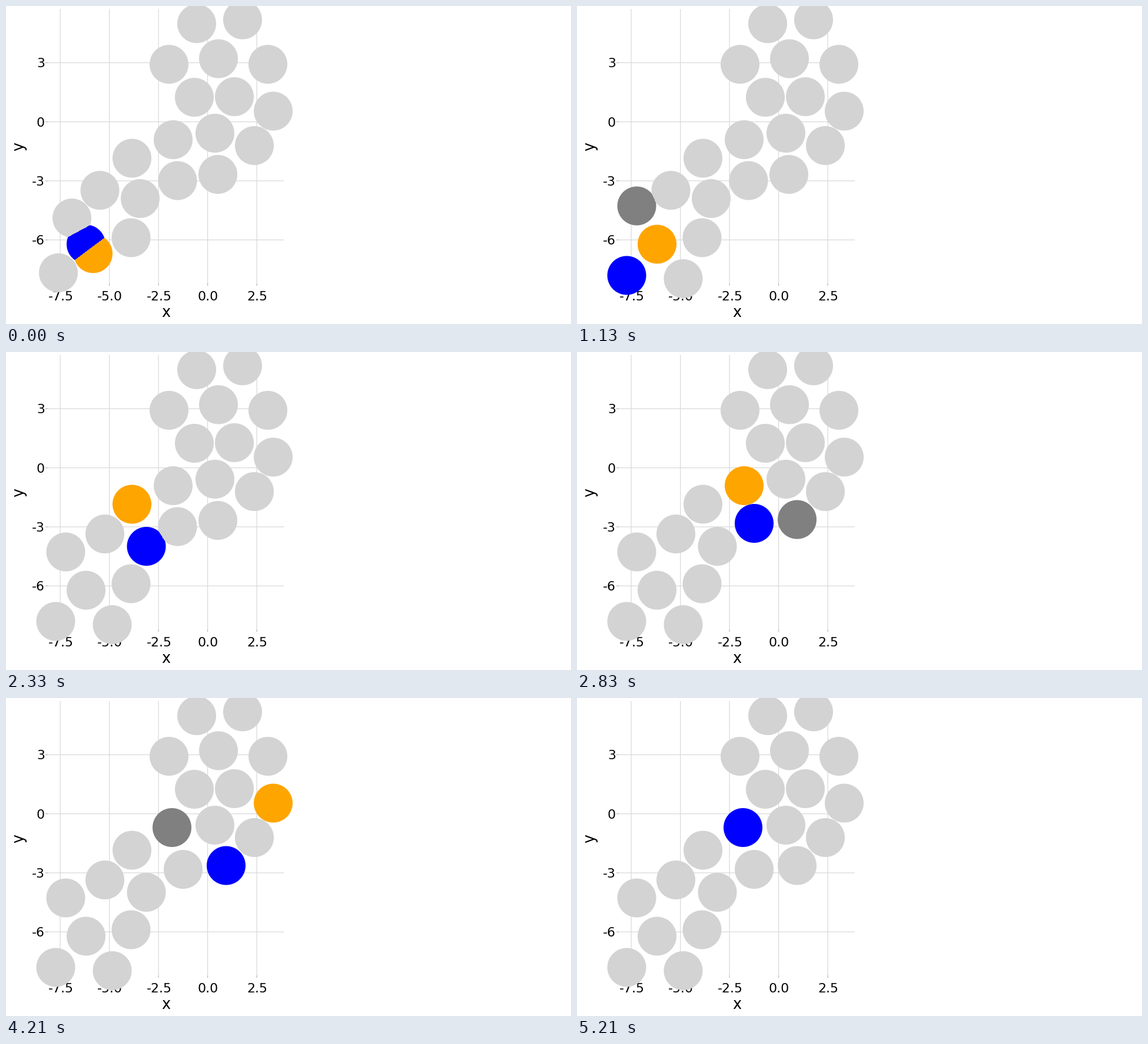
A matplotlib script for the animation above (5250 ms loop, 960x540 px).

```python
import numpy as np
import matplotlib.pyplot as plt
from matplotlib.animation import FuncAnimation

W, H, DPI = 960, 540, 100
PX = 72 / DPI
LOOP_MS = 5250
R, SPAN = 33, 500

LIGHT, DARK = (211, 211, 211), (128, 128, 128)
BLUE, ORANGE = (0, 0, 255), (255, 165, 0)

# Cell centres in pixels
START = dict(
    A=(324, 30), B=(402, 23.5), C=(277, 99), D=(361, 89.5), E=(445, 99),
    F=(320, 155), G=(388, 154), H=(454, 178.5), I=(355, 216), J=(422, 237),
    K=(284, 227), L=(360, 286), M=(291.5, 296.5), N=(228, 327),
    O=(159.5, 313), P=(214, 258.5), Q=(112, 360), R=(212.5, 393.5),
    S=(136, 404.5), T=(89, 453), U=(148, 420.5))
NAMES = list(START)

# Pushed cell: (pushing cell, place after the push)
PUSHES = dict(
    U=('S', (180.5, 463)), T=('S', (84.5, 457.5)), Q=('S', (101.5, 339.5)),
    O=('Q', (168, 309)), N=('O', (238.5, 330)), M=('N', (301, 291)),
    L=('M', (374, 284.5)), K=('M', (282, 220)))

# Active cell and the order of its checks; a dot is a pause
VISITS = [
    ('S', 'UTQRONMLPKI.'), ('U', 'PRNMOQST..'), ('T', '.UQROSNMP.'),
    ('Q', '.USRONMPTKIL'), ('O', 'PNTSRMKILQU.'), ('N', 'POMKILRSQU.'),
    ('M', 'LKIJHNOPRSBAUTQCEDGF'), ('L', 'ABDFGCEMKNIJUTHPRS'),
    ('K', 'FMIPLNJGCDEUTSOQRHAB.')]


def relax():
    """List the steps as (places, active, checked, waiting)."""
    pos, waiting, steps = dict(START), set(), []
    for active, order in VISITS:
        waiting.discard(active)
        for other in order:
            steps.append((tuple(pos.values()), active, other, set(waiting)))
            pusher, place = PUSHES.get(other, (None, None))
            if pusher == active:
                pos[other] = place
                waiting.add(other)
    return steps


yy, xx = np.mgrid[0:H, 0:SPAN] + 0.5
regions = {}


def region(places):
    """Nearest cell and coverage for every pixel."""
    if places not in regions:
        best = np.full((H, SPAN), 1e9)
        owner = np.zeros((H, SPAN), int)
        for k, (x, y) in enumerate(places):
            d = np.hypot(xx - x, yy - y)
            near = d < best
            best[near], owner[near] = d[near], k
        regions[places] = owner, np.clip(R + 0.5 - best, 0, 1)
    return regions[places]


def paint(step):
    places, active, other, waiting = step
    owner, cover = region(places)
    colors = np.array([BLUE if n == active else ORANGE if n == other
                       else DARK if n in waiting else LIGHT for n in NAMES])
    rgba = np.empty((H, SPAN, 4), np.uint8)
    rgba[..., :3] = colors[owner]
    rgba[..., 3] = np.round(255 * cover)
    return rgba


plt.rcParams['font.family'] = 'DejaVu Sans'
fig = plt.figure(figsize=(W / DPI, H / DPI), dpi=DPI, facecolor='white')
ax = fig.add_axes([0, 0, 1, 1])
ax.axis('off')


def line(xs, ys, color):
    ax.plot(xs, ys, color=color, lw=1.2 * PX, solid_capstyle='butt',
            snap=False, zorder=1)


def label(x, y, text, size, **kw):
    ax.text(x, y, text, fontsize=size * PX, va='baseline', color='black',
            zorder=2, **kw)


GRID, TICK = '#d8d8d8', '#b4b4b4'
for v in (-7.5, -5.0, -2.5, 0.0, 2.5):
    x = 342.6 + 33.4 * v
    line([x, x], [5, 471], GRID)
    line([x, x], [471, 475], TICK)
    label(x + 0.8, 500, f'{v:.1f}', 22, ha='center')
for v in (3, 0, -3, -6):
    y = 196.6 - 33.43 * v
    line([71, 472], [y, y], GRID)
    line([67, 71], [y, y], TICK)
    label(66, y + 8, str(v), 22, ha='right')
label(271.5, 528, 'x', 25.5, ha='center')
label(29.5, 238, 'y', 25.5, ha='center', rotation=90, rotation_mode='anchor')

steps = relax()
FRAMES = 2 * len(steps)
cells = ax.imshow(paint(steps[0]), extent=(0, SPAN, H, 0), aspect='auto',
                  interpolation='nearest', zorder=3)
ax.set_xlim(0, W)
ax.set_ylim(H, 0)


def update(i):
    # Two frames per step, rounded to the nearest step
    cells.set_data(paint(steps[min((i + 1) // 2, len(steps) - 1)]))
    return [cells]


anim = FuncAnimation(fig, update, frames=FRAMES, interval=LOOP_MS / FRAMES,
                     repeat=True, repeat_delay=0)
plt.show()
```
